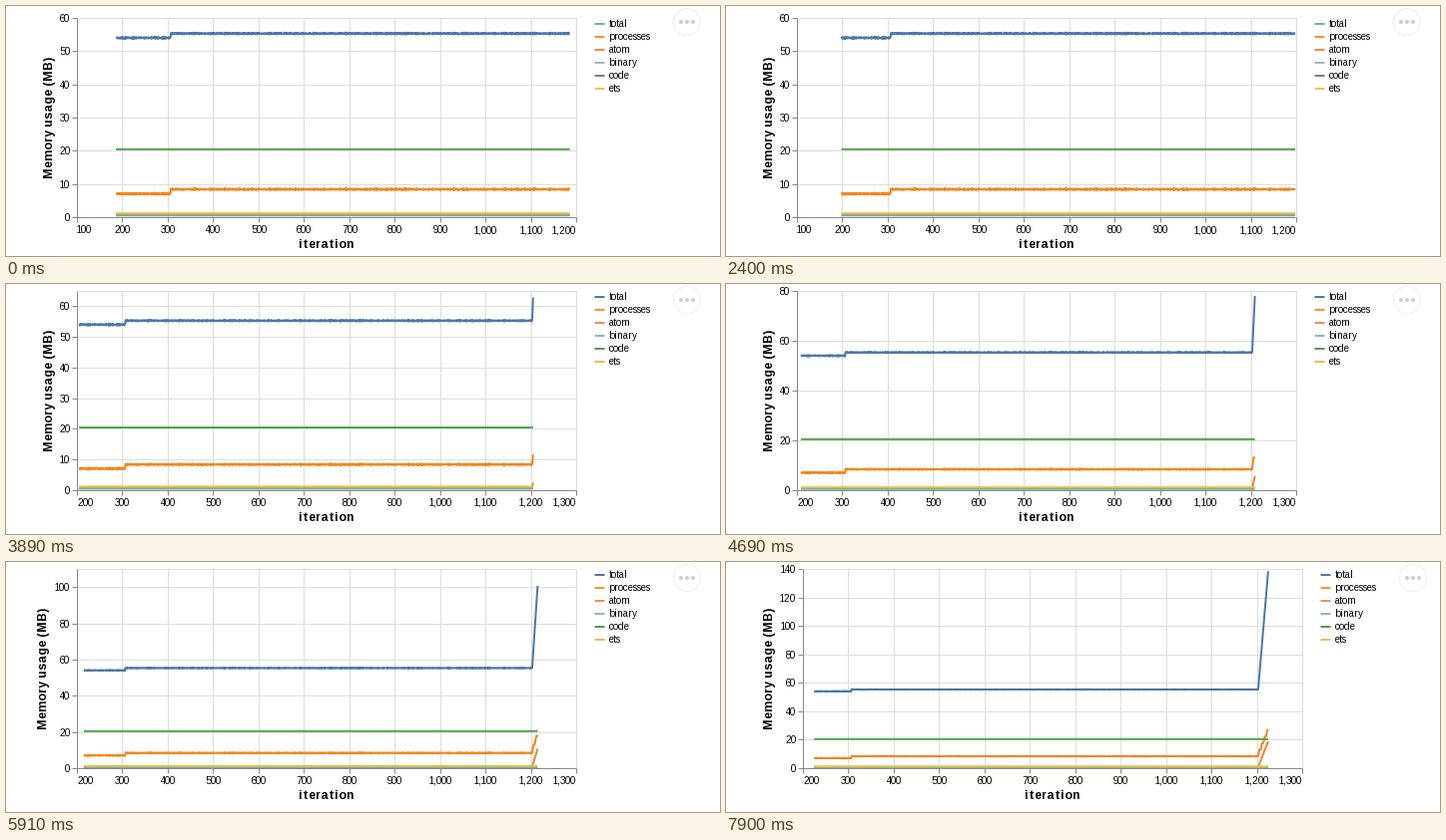
Recreate the animation shown at these times as a matplotlib script. Size 715x251 px, loop 8000 ms.

```python
import math

import matplotlib.pyplot as plt
import numpy as np
from matplotlib.animation import FuncAnimation
from matplotlib.patches import Circle

W, H, DPI = 715, 251, 64
STEP_MS, LOOP_MS = 40, 8000
PLOT_W, PLOT_H = 500, 200
FIRST, WINDOW, SAMPLES = 1186, 1000, 39
LEAK = 1203                        # iteration at which memory starts to climb
MOVE_UP, MOVE_RIGHT = 1205, 1218   # iterations at which the layout is refitted

LEGEND_EARLY = {"total": "#68afb5", "processes": "#f9923c", "atom": "#f28a4b",
                "binary": "#a9b3be", "code": "#6c8c66", "ets": "#e9c84f"}
LEGEND_LATE = {"total": "#4c78a8", "processes": "#f8962f", "atom": "#ec9358",
               "binary": "#8db8c2", "code": "#5c9160", "ets": "#fbb650"}

plt.rcParams.update({"font.family": "Liberation Sans",
                     "text.hinting_factor": 1})

# One sample every 200 ms, falling slightly behind from the 14th on
count = np.arange(1, SAMPLES + 1)
arrivals = 200 * count + np.interp(count, [14, 17, 29], [0, 90, 110])

# Memory curves by iteration
it = np.arange(FIRST + SAMPLES + 1)
age = np.maximum(it - LEAK, 0)
rng = np.random.default_rng(4)
jitter = rng.uniform(0, 0.13, it.size) * np.where(it % 2, 1, -1) * (age == 0)
grown = it >= 307

stair = age / 5.8
stair = np.floor(stair) + np.minimum(1, stair % 1 * 2)
total = np.where(grown, 55.3, 54) + jitter + 3.78 * age
processes = np.where(grown, 8.4, 7.05) + jitter + 4.65 * stair
climbing = 0.8 + 0.82 * age


def flat(value):
    return np.full(it.size, value)


SERIES = [
    (total, "#4c78a8"),
    (climbing, "#ee8435"),
    (processes, "#f58518"),
    (flat(0.5), "#72a9b7"),
    (flat(20.45), "#54a24b"),
    (flat(1.15), "#e6c13a"),
]

fig = plt.figure(figsize=(W / DPI, H / DPI), dpi=DPI, facecolor="white")
ax = fig.add_axes([0, 0, 1, 1])


def pt(px):
    return px * 72 / DPI


def tick_step(span, count):
    raw = span / count
    base = 10 ** math.floor(math.log10(raw))
    for factor, limit in ((10, 50), (5, 10), (2, 2)):
        if raw / base >= math.sqrt(limit):
            return base * factor
    return base


def nice(lo, hi):
    step = tick_step(hi - lo, 10)
    return math.floor(lo / step) * step, math.ceil(hi / step) * step


def ticks(lo, hi, count):
    return np.arange(lo, hi + 1, tick_step(hi - lo, count))


def line(xs, ys, color, width=2):
    ax.plot(xs, ys, color=color, lw=pt(width), snap=False,
            solid_capstyle="butt", solid_joinstyle="miter")


def rule(x0, y0, x1, y1, color):
    """One crisp pixel line between whole-pixel positions."""
    line([x0 + 0.5, x1 + 0.5], [y0 + 0.5, y1 + 0.5], color, 1)


def text(x, y, s, size=10, **kw):
    ax.text(x, y, s, fontsize=pt(size), va="baseline", color="black", **kw)


def draw_axes(left, top, xdom, ydom, to_x, to_y):
    right, bottom = left + PLOT_W, top + PLOT_H
    xs, ys = ticks(*xdom, 13), ticks(*ydom, 5)
    xticks = [(round(to_x(v)), v) for v in xs]
    yticks = [(round(to_y(v)), v) for v in ys]

    for x, _ in xticks:
        rule(x, top, x, bottom, "#dddddd")
    for y, _ in yticks:
        rule(left, y, right, y, "#dddddd")
    rule(left, top, right, top, "#dddddd")
    rule(right, top, right, bottom, "#dddddd")

    for x, v in xticks:
        rule(x, bottom, x, bottom + 5, "#888888")
        ha = {xdom[0]: "left", xdom[1]: "right"}.get(v, "center")
        text(x, bottom + 16, f"{v:,.0f}", ha=ha)
    for y, v in yticks:
        rule(left - 5, y, left, y, "#888888")
        text(left - 7, y + 4, f"{v:.0f}", ha="right")
    rule(left, top, left, bottom, "#888888")
    rule(left, bottom, right, bottom, "#888888")

    bold = dict(size=11.6, ha="center", weight="bold")
    text(left + PLOT_W / 2, bottom + 31, "iteration", **bold)
    gap = 30.5 if ys[-1] >= 100 else 24.5
    text(left - gap, top + PLOT_H / 2, "Memory usage (MB)", rotation=90,
         rotation_mode="anchor", **bold)


def draw_legend(left, top, colors):
    for row, (name, color) in enumerate(colors.items()):
        y = top + 6 + 13 * row
        line([left + 518.5, left + 528.5], [y, y], color)
        text(left + 533, y + 3, name)


def draw_menu(x, y):
    ax.add_patch(Circle((x, y), 13.5, fc="white", ec="#eeeeee", lw=pt(1)))
    for dx in (-6, 0, 6):
        ax.add_patch(Circle((x + dx, y), 2, fc="#cccccc", ec="none"))


def draw(frame):
    now = (frame + 1) * STEP_MS - 1
    last = FIRST + int(np.searchsorted(arrivals, now, side="right"))
    shown = slice(last - WINDOW, last + 1)

    ax.clear()
    ax.set_xlim(0, W)
    ax.set_ylim(H, 0)
    ax.axis("off")

    left = 77 if last >= MOVE_RIGHT else 71
    top = 7 if last >= MOVE_UP else 12
    xdom = nice(last - WINDOW, last)
    ydom = nice(0, total[shown].max())

    def to_x(v):
        return left + (v - xdom[0]) / (xdom[1] - xdom[0]) * PLOT_W

    def to_y(v):
        return top + PLOT_H - v / ydom[1] * PLOT_H

    draw_axes(left, top, xdom, ydom, to_x, to_y)
    for values, color in SERIES:
        line(to_x(it[shown]), to_y(values[shown]), color)
    draw_legend(left, top, LEGEND_LATE if last >= MOVE_UP else LEGEND_EARLY)
    draw_menu(left + 611, 16)
    return []


anim = FuncAnimation(fig, draw, frames=LOOP_MS // STEP_MS, init_func=lambda: [],
                     interval=STEP_MS, repeat=True, repeat_delay=0)
plt.show()
```
